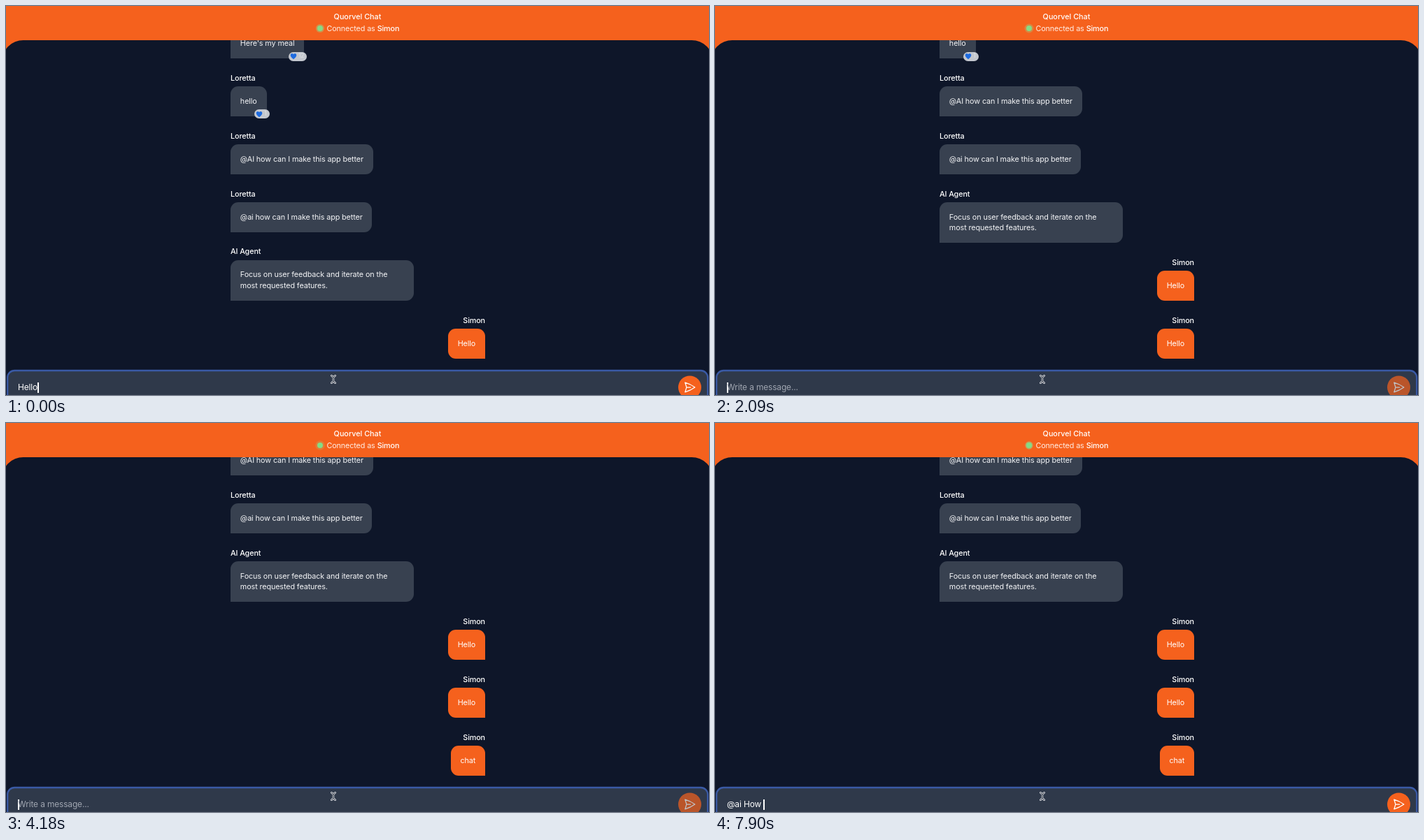
Write an HTML page that moves like this. It is 1005 by 557 pixels and loops after 8 s.

```html
<!DOCTYPE html>
<html lang="en">
<head>
<meta charset="utf-8">
<title>Chat</title>
<style>
  html, body { margin: 0; width: 100%; height: 100%; overflow: hidden; background: #f5611d; }
  body { position: relative; color: #fff; font: 10.8px/15.4px Inter, "Open Sans", sans-serif; letter-spacing: -.0108em; }
  body > * { position: absolute; white-space: pre; }
  b { font-weight: 500; }
  #panel { left: -5.6px; top: 49px; width: 1016.2px; height: 540px; border-radius: 30.8px 30.8px 0 0; background: #0e1629; }
  #title { left: 0; top: 8.3px; width: 1005px; text-align: center; letter-spacing: 0; }
  #status { left: 458.4px; top: 24.5px; color: #ffeee5; }
  #status b { color: #fff; }
  #view { left: 321px; top: 49px; width: 380px; height: 472px; overflow: hidden; }
  #list { position: absolute; width: 364px; }
  .msg { display: flex; flex-direction: column; align-items: flex-start; margin-bottom: 20.8px; }
  .msg.own { align-items: flex-end; }
  .bubble { position: relative; box-sizing: border-box; margin-top: 4px; padding: 13.6px 13.86px; border-radius: 11px 11px 11px 0; background: #384150; color: #f3f4f6; }
  .wide { width: 262.4px; }
  .own .bubble { border-radius: 11px 11px 0 11px; background: #f5611d; color: #fff; }
  .badge { position: absolute; right: -4px; bottom: -3.5px; height: 13px; padding: 0 4px 0 2px; display: flex; align-items: center; gap: 2px; border-radius: 7px; background: #c3c7ce; color: #dde0e4; font-size: 8.5px; }
  #scroll { left: 1003.5px; width: 1.5px; bottom: 0; background: #8b919c; }
  #input { left: 17px; top: 538.5px; height: 15px; display: flex; align-items: center; font-size: 11.9px; }
  #caret { width: 1.5px; height: 15px; background: #fff; }
  #hint { margin-left: -1.5px; color: #a0a6b1; }
  #art { left: 0; top: 0; }
</style>
</head>
<body>
<div id="panel"></div>
<b id="title">Quorvel Chat</b>
<div id="status">Connected as <b>Simon</b></div>
<div id="view"><div id="list"></div></div>
<svg id="art" width="1005" height="557" fill="none">
  <rect x="2.2" y="522" width="1001" height="60" rx="10" fill="#2f394a" stroke="#3a5aa5" stroke-width="2.3"/>
  <circle id="ping" cx="449" cy="32" fill="#86efac"/>
  <circle cx="449" cy="32" r="4" fill="#84dc86"/>
  <g id="send">
    <circle cx="977.5" cy="546" r="16.5" fill="#f5611d"/>
    <path transform="translate(968.3 536.8) scale(.77)" stroke="#fff" stroke-width="1.6" stroke-linejoin="round" stroke-linecap="round"
      d="M6 12 3.27 3.13A59.8 59.8 0 0 1 21.5 12 59.8 59.8 0 0 1 3.27 20.87L6 12h7.5"/>
  </g>
  <g stroke-linecap="round">
    <path id="beam" stroke="#e5e7eb" stroke-width="2.6" d="M465.3 529.3 468 531.6V537.4L465.3 539.7M470.7 529.3 468 531.6M468 537.4 470.7 539.7"/>
    <path stroke="#1b2230" d="M465.3 529.3 468 531.6V537.4L465.3 539.7M470.7 529.3 468 531.6M468 537.4 470.7 539.7"/>
  </g>
</svg>
<div id="input"><span id="text"></span><span id="caret"></span><span id="hint">Write a message...</span></div>
<div id="scroll"></div>
<script>
const $ = id => document.getElementById(id);
const LOOP = 8000, ROW = 82.8, LIST_TOP = -35.85;

const messages = [
  ["Loretta", "Here's my meal", 12],
  ["Loretta", "hello", 1],
  ["Loretta", "@AI how can I make this app better"],
  ["Loretta", "@ai how can I make this app better"],
  ["AI Agent", "Focus on user feedback and iterate on the\nmost requested features."],
  ["Simon", "Hello"],
  ["Simon", "Hello"],
  ["Simon", "chat"],
];
const badge = n => `<span class="badge"><svg width="10" height="10" viewBox="0 0 10 10"><path fill="#1d6be0" d="M5 9.3C-3 3.5 2-1.3 5 2 8-1.3 13 3.5 5 9.3z"/></svg>${n}</span>`;
$("list").innerHTML = messages.map(([name, text, hearts]) =>
  `<div class="msg ${name === "Simon" ? "own" : ""}"><b>${name}</b>` +
  `<div class="bubble ${text.includes("\n") ? "wide" : ""}">${text}${hearts ? badge(hearts) : ""}</div></div>`).join("");

const typing = [
  [0, "Hello"], [450, ""],
  [1490, "c"], [1640, "ch"], [1790, "cha"], [1940, "chat"], [2090, ""],
  [4330, "@"], [4630, "@ai"], [5220, "@ai "],
  [7160, "@ai H"], [7460, "@ai Ho"], [7610, "@ai How"], [7900, "@ai How "],
];
const caretOff = [[1050, 1490], [2690, 3140], [3590, 4180], [5660, 6110], [6710, 7160]];
const scrolls = [[600, 235], [2240, 262]]; // time, thumb top
const clamp = x => Math.max(0, Math.min(1, x));

function draw(t) {
  const text = typing.filter(k => k[0] <= t).pop()[1];
  $("text").textContent = text;
  $("hint").style.display = text ? "none" : "";
  $("caret").style.opacity = caretOff.some(([a, b]) => t >= a && t < b) ? 0 : 1;
  $("send").style.opacity = text ? 1 : .7;

  const done = scrolls.filter(s => s[0] <= t);
  $("list").style.top = LIST_TOP - ROW * done.length + "px";
  const [at, top] = done.length ? done[done.length - 1] : [-LOOP, 0];
  $("scroll").style.top = top + "px";
  $("scroll").style.opacity = 1 - clamp((t - at - 430) / 250);

  // The status ring spreads once a second, with one beat left out.
  const p = t > 4600 && t < 5640 ? 1 : clamp((t + 350) % 1000 / 750);
  $("ping").setAttribute("r", 3.9 + 3.1 * (1 - (1 - p) ** 2));
  $("ping").style.opacity = .65 * (1 - p);
}

const start = performance.now();
(function frame() {
  draw((performance.now() - start) % LOOP);
  requestAnimationFrame(frame);
})();
</script>
</body>
</html>
```
